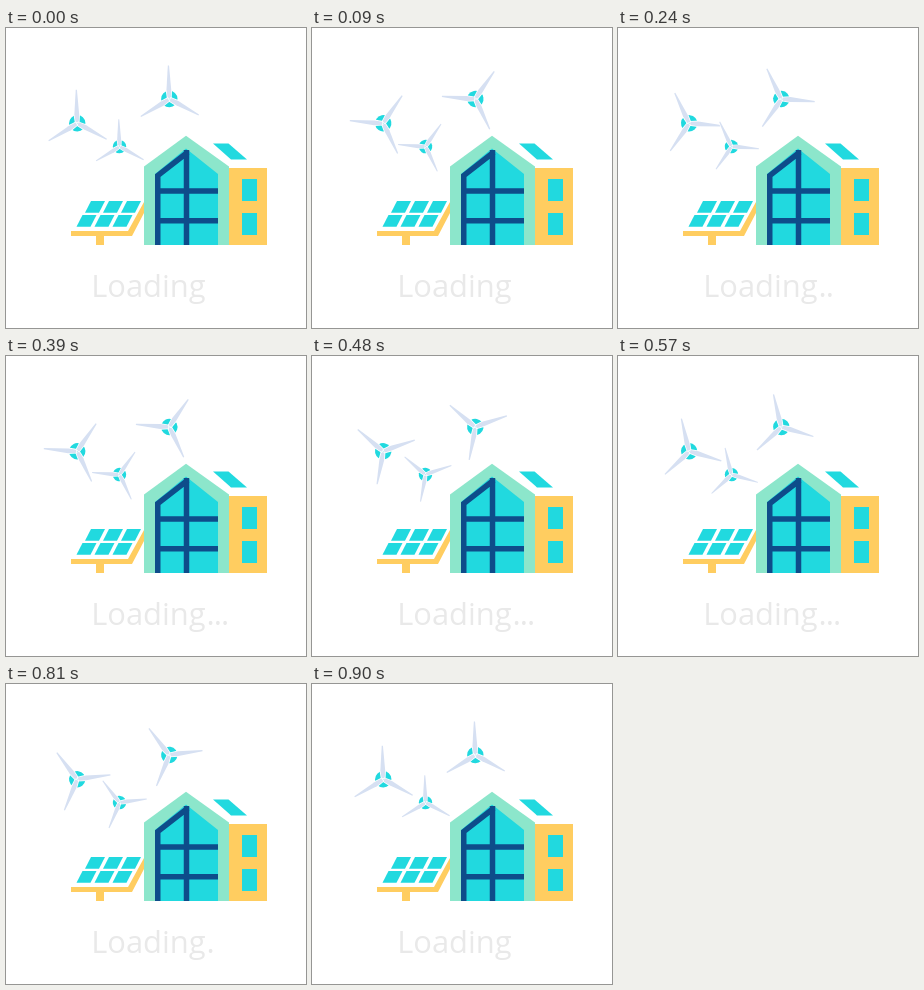
These frames come from a looping animation (300x300 px, 0.93 s). An HTML page:

```html
<!DOCTYPE html>
<html lang="en">
<head>
<meta charset="utf-8">
<title>Loading</title>
<style>
  html, body { margin: 0; width: 100%; height: 100%; overflow: hidden; background: #fff; }
  svg { display: block; width: 100vw; height: 100vh; }
  text { font: 400 30.9px "Open Sans", "Noto Sans", sans-serif; fill: #e9e9e9; }
  .cyan { fill: #21d9df; }
  .mint { fill: #8ce6cb; }
  .gold { fill: #ffcd60; }
  .bars { fill: none; stroke: #0e4c8a; stroke-width: 5.5; }
  .blade { fill: #d6e0f2; }
  .gap { fill: none; stroke: #fff; stroke-width: 1.6; }
</style>
</head>
<body>
<svg viewBox="0 0 300 300">
  <defs>
    <g id="blade">
      <path class="gap" d="M-1.6 -1L-2.6 -9L-.6 -33.5H.6L2.2 -9L1.6 -1Z"/>
      <path class="blade" d="M-1.6 -1L-2.6 -9L-.6 -33.5H.6L2.2 -9L1.6 -1Z"/>
    </g>
    <g id="rotor">
      <circle class="cyan" r="8.2"/>
      <use href="#blade"/>
      <use href="#blade" transform="rotate(120)"/>
      <use href="#blade" transform="rotate(240)"/>
    </g>
  </defs>

  <g id="rotors"></g>

  <g id="panel">
    <path class="gold" d="M138 174V185L126 208H98V217H90V208H65V203H122Z"/>
    <g id="cells"></g>
  </g>

  <g id="house">
    <path class="gold" d="M221 140H261V217H221Z"/>
    <path class="cyan" d="M236 151H251V173H236ZM236 185H251V207H236Z"/>
    <path class="cyan" d="M207 115.5H222.5L241 131.5H225Z"/>
    <path class="mint" d="M180 107.7L223 138.5V217H138V138.5Z"/>
    <path class="cyan" d="M180 120.5L212 146V217H149V146Z"/>
    <path class="bars" d="M151.75 217V147.5L182 124M180.5 122V217M150 163H212M150 192.7H212"/>
  </g>

  <text x="85.2" y="268.5">Loading</text>
  <text id="dots" x="200.5" y="268.5" letter-spacing="-1"></text>
</svg>
<script>
  const NS = "http://www.w3.org/2000/svg";
  const LOOP = 930, STEP = 30, TURN = 12, TILT = -1.5;
  const DOT_COUNTS = [0, 1, 2, 3, 3, 2, 1, 0];
  const rotors = [
    { x: 71.2, y: 95.3, size: 1 },
    { x: 163.3, y: 71, size: 1 },
    { x: 113.5, y: 118.6, size: 0.82 }
  ];
  const byId = id => document.getElementById(id);

  function add(parent, tag, attrs) {
    const el = document.createElementNS(NS, tag);
    for (const key in attrs) el.setAttribute(key, attrs[key]);
    return parent.appendChild(el);
  }

  for (const r of rotors) r.el = add(byId("rotors"), "use", { href: "#rotor" });

  for (let row = 0; row < 2; row++) {
    for (let col = 0; col < 3; col++) {
      const x = 85 + col * 18 - row * 8.5, y = 173 + row * 14;
      add(byId("cells"), "path", { class: "cyan", d: `M${x} ${y}h14l-6 11.7h-14z` });
    }
  }

  function draw(time) {
    const t = time % LOOP;
    const angle = Math.floor(t / STEP) * TURN + TILT;
    for (const r of rotors) {
      r.el.setAttribute("transform", `translate(${r.x} ${r.y}) rotate(${angle}) scale(${r.size})`);
    }
    byId("dots").textContent = ".".repeat(DOT_COUNTS[Math.floor(t / 120)]);
  }

  let start = null;
  function tick(now) {
    if (start === null) start = now;
    draw(Math.max(0, now - start));
    requestAnimationFrame(tick);
  }
  draw(0);
  requestAnimationFrame(tick);
</script>
</body>
</html>
```
